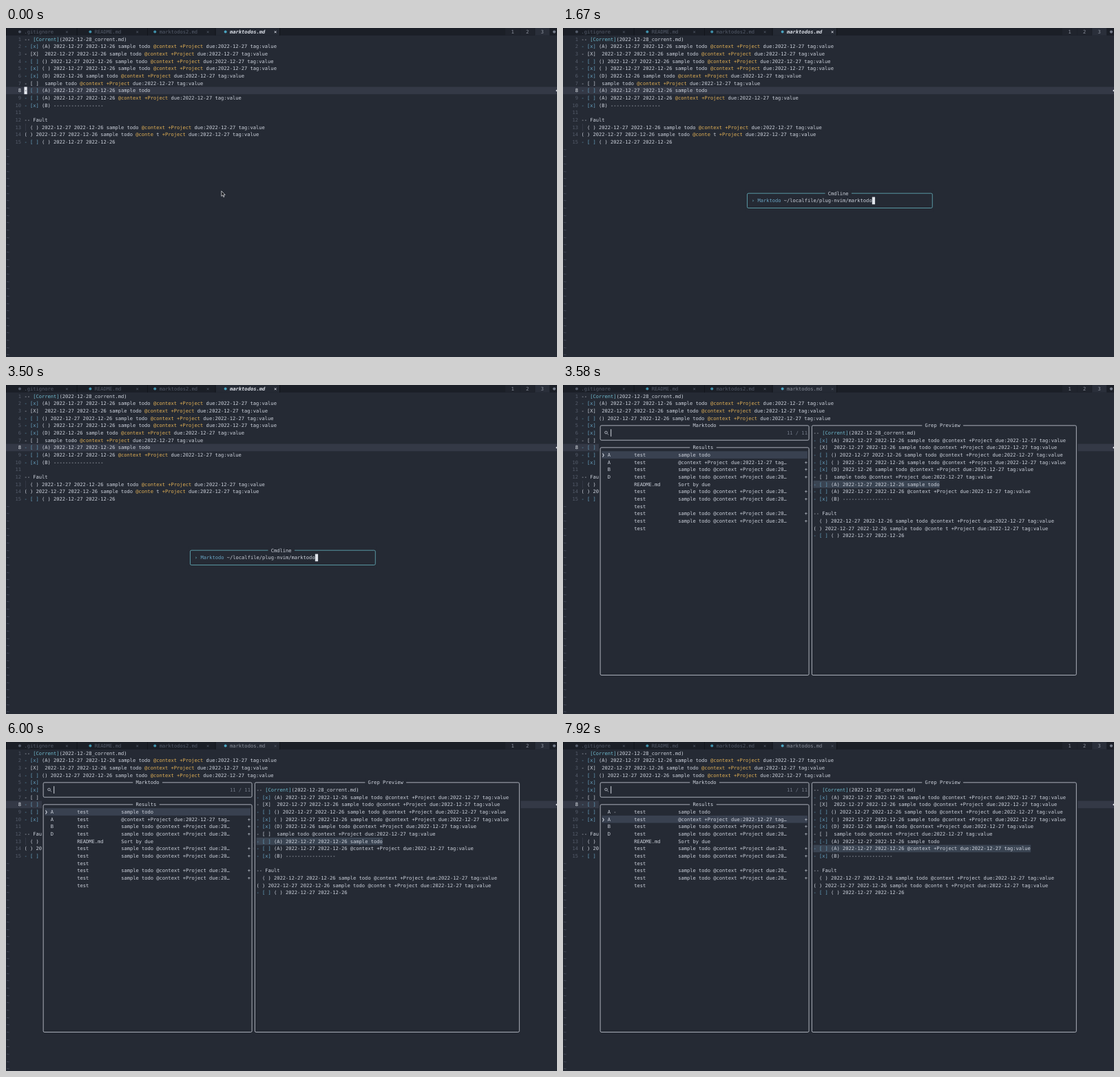
An HTML page that plays this animation: 800 px wide and 478 px high, repeating every 8 s.

```html
<!DOCTYPE html>
<html lang="en">
<head>
<meta charset="utf-8">
<title>Todo picker</title>
<style>
html, body { margin: 0; width: 100%; height: 100%; overflow: hidden; background: #252a34; }
svg { display: block; width: 100vw; height: 100vh; }
text {
  font: 7.088px "DejaVu Sans Mono", monospace;
  white-space: pre;
  text-rendering: geometricPrecision;
  fill: #cdd2dc;
}
.blue { fill: #6aa5c4; }
.link { fill: #6fb9cc; }
.tag { fill: #dfae55; }
.dim { fill: #555c6b; }
.count { fill: #747b89; }
.dark { fill: #252a34; }
.bright { fill: #e4e8ef; }
.soft { fill: #8b919d; }
.title { fill: #e0e4ec; font-weight: bold; font-style: italic; }
</style>
</head>
<body>
<svg id="stage" viewBox="0 0 800 478" preserveAspectRatio="none"></svg>
<script>
const LOOP = 8000;
const TIMES = { mouseGone: 750, cmdOpen: 920, recall: 1330, picker: 3580, toggle: 6920, next: 7750 };
const CELL = 64 / 15, ROW = 32 / 3;
const BG = '#252a34', FG = '#c4c9d3';

const colX = c => c * CELL + 0.8;
const rowY = r => r * ROW + 0.2;

const rect = (x, y, w, h, fill, extra = '') =>
  `<rect x="${x}" y="${y}" width="${w}" height="${h}" fill="${fill}" ${extra}/>`;
const cells = (c, r, n, fill) => rect(colX(c), rowY(r), n * CELL, ROW, fill);
const text = (c, r, str, cls = '') =>
  `<text x="${colX(c)}" y="${rowY(r) + 7.8}" class="${cls}">${str}</text>`;
const span = cls => m => `<tspan class="${cls}">${m}</tspan>`;
const layer = (from, to, ...parts) =>
  `<g data-from="${from}" data-to="${to}">${parts.join('')}</g>`;

const markup = str => str
  .replace(/^- \[.\](?= \()/, span('blue'))
  .replace(/\[Corrent\]/, span('link'));
const withTags = str => markup(str).replace(/[@+]\w+/g, span('tag'));

const DATES = '2022-12-27 2022-12-26';
const META = '@context +Project due:2022-12-27 tag:value';
const TODO = `sample todo ${META}`;
const LINES = [
  '-- [Corrent](2022-12-28_corrent.md)',
  `- [x] (A) ${DATES} ${TODO}`,
  `- [X]  ${DATES} ${TODO}`,
  `- [ ] () ${DATES} ${TODO}`,
  `- [x] ( ) ${DATES} ${TODO}`,
  `- [x] (D) 2022-12-26 ${TODO}`,
  `- [ ]  ${TODO}`,
  `- [ ] (A) ${DATES} sample todo`,
  `- [ ] (A) ${DATES} ${META}`,
  '- [x] (B) ' + '-'.repeat(17),
  '',
  '-- Fault',
  `  ( ) ${DATES} ${TODO}`,
  `( ) ${DATES} ${TODO.replace('@context', '@conte t')}`,
  `- [ ] ( ) ${DATES}`
];

const CUT = 'sample todo @context +Project due:20…';
const RESULTS = [
  ['A', 'test', 'sample todo'],
  ['A', 'test', '@context +Project due:2022-12-27 tag…'],
  ['B', 'test', CUT],
  ['D', 'test', CUT],
  ['', 'README.md', 'Sort by due'],
  ['', 'test', CUT],
  ['', 'test', CUT],
  ['', 'test', ''],
  ['', 'test', CUT],
  ['', 'test', CUT],
  ['', 'test', '']
];

function tabBar() {
  const tab = (c, name, closeCol, color) =>
    `<circle cx="${colX(c) + 2.1}" cy="5.6" r="2" fill="${color}"/>` +
    (name ? text(c + 2, 0, name, 'dim') : '') + text(closeCol, 0, '×', 'dim');
  const edge = x => rect(x, 0, 1, 10.8, '#12151b');
  const page = (x, n, fill) => rect(x, 0, 21, 10.8, fill) +
    `<text x="${x + 8.4}" y="8" class="soft">${n}</text>`;
  return [
    rect(0, 0, 800, 10.8, '#1b1f27'),
    rect(304, 0, 93.5, 10.8, BG),
    [0, 102.6, 205, 303.6, 397].map(edge).join(''),
    tab(4, '.gitignore', 20, '#555c6b'),
    tab(28, 'README.md', 44, '#3f8fa9'),
    tab(50, 'marktodos2.md', 68, '#3f8fa9'),
    tab(74, '', 91, '#4aa3bf'),
    layer(0, TIMES.picker, text(76, 0, 'marktodos.md', 'title'), text(91, 0, '×', 'bright')),
    layer(TIMES.picker, LOOP, text(76, 0, 'marktodos.md', 'soft')),
    page(725, 1, '#20242d'), page(746.6, 2, '#20242d'), page(768.2, 3, '#2a2f3a'),
    '<circle cx="796" cy="5.6" r="2.1" fill="#747b89"/>'
  ].join('');
}

function editor() {
  const numbers = LINES.map((_, i) =>
    text(3, i + 1, String(i + 1).padStart(2), i === 7 ? 'bright' : 'dim'));
  const body = LINES.map((line, i) => text(6, i + 1, withTags(line)));
  const tildes = Array.from({ length: 29 }, (_, i) => text(0, i + 16, '~', 'dim'));
  return [
    rect(0, rowY(8), 800, ROW, '#343946'),
    ...numbers, ...body, ...tildes,
    rect(colX(6) + 1.8, rowY(13), 0.6, ROW, '#3d4452'),
    '<path d="M798 91l2-1.6v3.2z" fill="#e4e8ef"/>',
    layer(0, TIMES.cmdOpen, cells(6, 8, 1, '#e4e8ef'), text(6, 8, '-', 'dark'))
  ].join('');
}

// Bordered window; borders run through the middle of their cells.
function frame(c1, r1, c2, r2, title, titleCol, stroke) {
  const x = colX(c1), y = rowY(r1), w = (c2 - c1) * CELL, h = (r2 - r1) * ROW;
  return rect(x, y, w + CELL, h + ROW, BG) +
    rect(x + CELL / 2, y + ROW / 2, w, h, 'none', `rx="1.8" stroke="${stroke}" stroke-width="0.85"`) +
    cells(titleCol - 1, r1, title.length + 2, BG) +
    text(titleCol, r1, title);
}

function cmdline() {
  const { cmdOpen, recall, picker } = TIMES;
  const caret = c => cells(c, 23, 1, '#dfe3ea');
  return layer(cmdOpen, picker,
    frame(62, 22, 125, 24, 'Cmdline', 90, '#62acb8'),
    text(64, 23, '›', 'link'),
    layer(cmdOpen, recall, caret(66)),
    layer(recall, picker,
      text(66, 23, 'Marktodo', 'blue'),
      text(75, 23, '~/localfile/plug-nvim/marktodo'),
      caret(105)));
}

function picker() {
  const { picker: open, toggle, next } = TIMES;
  const selection = (i, lineNo, from, to) => layer(from, to,
    cells(13, 9 + i, 70, '#394150'),
    text(13, 9 + i, '❯', 'bright'),
    cells(85, 5 + lineNo, LINES[lineNo - 1].length, '#3a4452'));
  const results = RESULTS.map(([priority, file, body], i) =>
    text(15, 9 + i, priority) + text(24, 9 + i, file) + text(39, 9 + i, body) +
    (body.endsWith('…') ? text(82, 9 + i, '+') : ''));
  const preview = LINES.map((line, i) => i === 7 ? '' : text(85, 6 + i, markup(line)));
  const active = LINES[7];
  return layer(open, LOOP,
    frame(12, 5, 83, 7, 'Marktodo', 44, FG),
    frame(12, 8, 83, 39, 'Results', 44, FG),
    frame(84, 5, 174, 39, 'Grep Preview', 123, FG),
    '<path d="M64 70.4l2 2" stroke="#c4c9d3" stroke-width="0.8"/>',
    '<circle cx="62.5" cy="69" r="1.8" fill="none" stroke="#c4c9d3" stroke-width="0.8"/>',
    rect(colX(16) + 0.2, rowY(6), 0.9, ROW, '#e4e8ef'),
    text(76, 6, '11 / 11', 'count'),
    selection(0, 8, open, next),
    selection(1, 9, next, LOOP),
    ...results, ...preview,
    layer(open, toggle, text(85, 13, markup(active))),
    layer(toggle, LOOP,
      text(17, 9, '-'),
      text(85, 13, markup(active.replace('[ ]', '[-]')))));
}

const mouse = layer(0, TIMES.mouseGone,
  '<path d="M312.8 236.8v7.6l1.8-1.6 1.2 2.8 1.2-.5-1.2-2.7h2.4z" ' +
  'fill="#14161a" stroke="#eef0f4" stroke-width="0.7"/>');

const stage = document.getElementById('stage');
stage.innerHTML = rect(0, 0, 800, 478, BG) + tabBar() + editor() + cmdline() + picker() + mouse;

const layers = [...stage.querySelectorAll('[data-from]')].map(el =>
  ({ el, from: +el.dataset.from, to: +el.dataset.to }));
const start = performance.now();

function draw(now) {
  const t = Math.max(0, now - start) % LOOP;
  for (const { el, from, to } of layers) {
    el.style.display = t >= from && t < to ? '' : 'none';
  }
  requestAnimationFrame(draw);
}
draw(start);
</script>
</body>
</html>
```
